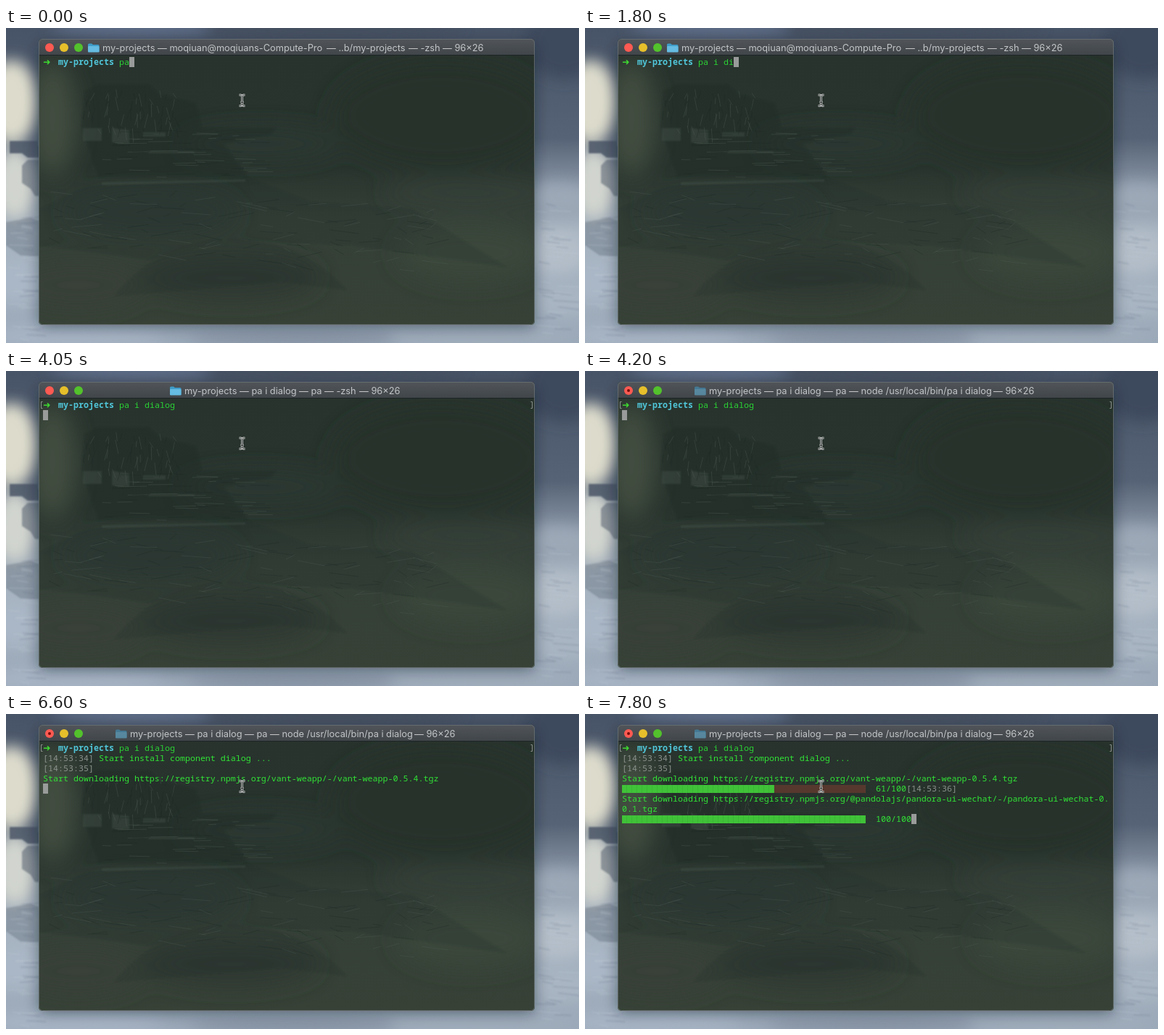
Recreate the animation shown at these times as an HTML page. Size 790 by 435 pixels, loop 8 s.

```html
<!DOCTYPE html>
<html lang="en">
<head>
<meta charset="utf-8">
<title>Terminal install</title>
<style>
  html, body { margin: 0; width: 100%; height: 100%; overflow: hidden; background: #59667a; }
  svg { display: block; width: 100%; height: 100%; }
  .mono { font: 500 11.667px "Noto Sans Mono", "DejaVu Sans Mono", monospace; }
  .title { font: 12.8px Inter, Roboto, sans-serif; fill: #c3c5c7; }
  .dir { fill: #50c5d8; font-weight: 700; }
  .cmd { fill: #2bd335; }
  .log { fill: #31e336; }
  .time { fill: #8c928d; font-weight: 400; }
  .arrow { fill: #3ed831; font: 700 12.5px "DejaVu Sans", sans-serif; }
</style>
</head>
<body>
<svg viewBox="0 0 790 435" preserveAspectRatio="none">
  <defs>
    <linearGradient id="sky" x2="0" y2="1">
      <stop offset="0" stop-color="#475366"/>
      <stop offset=".35" stop-color="#566376"/>
      <stop offset=".5" stop-color="#8794a4"/>
      <stop offset=".65" stop-color="#a9b5c1"/>
      <stop offset="1" stop-color="#9aa8b8"/>
    </linearGradient>
    <linearGradient id="glass" x2="0" y2="1">
      <stop offset="0" stop-color="#28332d"/>
      <stop offset=".45" stop-color="#29342e"/>
      <stop offset=".62" stop-color="#343f37"/>
      <stop offset="1" stop-color="#374136"/>
    </linearGradient>
    <linearGradient id="bar" x2="0" y2="1">
      <stop offset="0" stop-color="#515559"/>
      <stop offset="1" stop-color="#404549"/>
    </linearGradient>
    <pattern id="todo" width="2" height="2" patternUnits="userSpaceOnUse">
      <path d="M0 0h1v1h-1zM1 1h1v1h-1z" fill="#853c2d"/>
    </pattern>
    <pattern id="done" x="51" width="7" height="11" patternUnits="userSpaceOnUse">
      <path d="M0 0h7v11h-7z" fill="#40c238"/>
      <path d="M6.5 0h.5v11h-.5z" fill="#37a833"/>
    </pattern>
    <filter id="soft" x="-50%" y="-50%" width="200%" height="200%"><feGaussianBlur stdDeviation="10"/></filter>
    <filter id="mistBlur" x="-50%" y="-50%" width="200%" height="200%"><feGaussianBlur stdDeviation="16"/></filter>
    <filter id="haze" x="-50%" y="-50%" width="200%" height="200%"><feGaussianBlur stdDeviation="1"/></filter>
    <filter id="shade" x="-10%" y="-10%" width="120%" height="125%"><feGaussianBlur stdDeviation="10"/></filter>
    <clipPath id="pane"><rect x="45" y="15" width="684" height="395" rx="5"/></clipPath>
  </defs>

  <rect width="790" height="435" fill="url(#sky)"/>
  <g id="clouds" filter="url(#soft)"></g>
  <g fill="#4a5667" filter="url(#haze)">
    <path d="M5 156H44V163H50V179H30L22 173H5Z" opacity=".85"/>
    <path d="M22 190L30 182H50V232H40L34 222L22 214Z" opacity=".5"/>
    <path d="M0 268L34 262L50 268V316L20 314L0 300Z" opacity=".3"/>
  </g>
  <g id="streaks" fill="none" filter="url(#haze)"></g>

  <rect x="46" y="24" width="682" height="388" rx="6" fill="#101722" opacity=".5" filter="url(#shade)"/>
  <g clip-path="url(#pane)">
    <rect x="45" y="15" width="684" height="395" fill="url(#glass)"/>
    <g id="mist" filter="url(#mistBlur)"></g>
    <g fill="#202b28" filter="url(#haze)" opacity=".5">
      <path d="M104 136L108 88L128 78H196L212 92L262 104L270 138H372L366 146L300 160L334 206H128L112 160Z" opacity=".8"/>
      <path d="M46 250L110 220L330 206L420 240L560 250L690 330L480 300L300 292L200 320L46 300Z" opacity=".35"/>
      <path d="M150 370Q210 296 304 292T470 362L380 350Z" opacity=".35"/>
    </g>
    <g fill="#4b5a51" opacity=".35" filter="url(#haze)">
      <path d="M106 138H132V156H106ZM146 138L170 141V160L146 158ZM188 144H220V150H188Z"/>
      <path d="M132 213L330 209V212L132 217ZM196 170H260V173H196Z"/>
    </g>
    <g id="hull" fill="none"></g>
    <rect x="45" y="15" width="684" height="23" fill="url(#bar)"/>
    <path d="M45 37.5H729" stroke="#1d2426"/>
  </g>
  <rect x="45.5" y="15.5" width="683" height="394" rx="5" fill="none" stroke="#6b7375" stroke-opacity=".8"/>
  <circle cx="60" cy="27" r="6" fill="#fd5a52"/>
  <circle cx="80" cy="27" r="6" fill="#e6bf2b"/>
  <circle cx="100" cy="27" r="6" fill="#53c22c"/>
  <g id="head" class="title"></g>
  <g id="term" class="mono"></g>
  <g fill="none">
    <path id="beam" d="M321.5 92.5H324L325.5 94L327 92.5H329.5M325.5 94V106M323.5 102.5H327.5M321.5 107.5H324L325.5 106L327 107.5H329.5" stroke="#f0f0f0" stroke-width="2.4"/>
    <path id="core" stroke="#161c1a" stroke-width=".9"/>
  </g>
</svg>
<script>
const LOOP = 8000, COLS = 48;
const $ = id => document.getElementById(id);

// Scenery
function blobs(id, list) {
  $(id).innerHTML = list.map(([x, y, rx, ry, c]) =>
    `<ellipse cx="${x}" cy="${y}" rx="${rx}" ry="${ry}" fill="${c}"/>`).join('');
}
function lines(id, n, seed, place) {
  let s = seed, out = '';
  const rnd = () => (s = s * 16807 % 2147483647) / 2147483647;
  for (let i = 0; i < n; i++) {
    const { x, y, dx, dy, c, o } = place(rnd);
    out += `<path d="M${x.toFixed(1)} ${y.toFixed(1)}l${dx.toFixed(1)} ${dy.toFixed(1)}" stroke="${c}" opacity="${o}"/>`;
  }
  $(id).innerHTML = out;
}
blobs('clouds', [
  [8, 102, 36, 58, '#dddccc'], [12, 215, 30, 50, '#d2d5cf'], [180, 0, 120, 12, '#61708a'],
  [450, 0, 180, 14, '#454f5f'], [770, 20, 55, 50, '#3d4a5d'], [762, 235, 45, 20, '#9da9b7'],
  [760, 310, 45, 30, '#b3bec9'], [765, 375, 50, 22, '#a9b5c2'], [18, 350, 45, 30, '#aab7c6'],
  [90, 426, 130, 14, '#a9b6c6'], [400, 430, 150, 12, '#8592a3'], [660, 428, 130, 12, '#a0adbb']
]);
blobs('mist', [
  [64, 125, 32, 80, '#424d41'], [350, 160, 110, 22, '#2b3733'], [600, 120, 150, 75, '#27312b'],
  [640, 228, 120, 12, '#37433a'], [200, 255, 120, 30, '#2f3b36'], [640, 310, 100, 40, '#3b463b'],
  [100, 355, 90, 32, '#374138'], [310, 345, 120, 30, '#2d3933']
]);
$('core').setAttribute('d', $('beam').getAttribute('d'));
lines('streaks', 60, 71, r => {
  const right = r() > .55;
  return {
    x: right ? 730 + r() * 35 : r() * 30, y: 240 + r() * 190,
    dx: 12 + r() * 25, dy: right ? 4 - r() * 3 : -3 + r() * 7,
    c: r() > .4 ? '#c6d0da' : '#66748a', o: .4
  };
});
lines('hull', 230, 29, r => {
  const k = r();
  const tower = k < .28, deck = k < .5;
  const x = tower ? 108 + r() * 130 : deck ? 130 + r() * 220 : 48 + r() * 540;
  const y = tower ? 84 + r() * 56 : deck ? 142 + r() * 64 : 220 + r() * 85 + x / 18;
  return {
    x, y, dx: tower ? r() * 12 - 6 : 8 + r() * 34, dy: tower ? 6 + r() * 14 : (r() - .5) * (deck ? 2 : 18),
    c: r() > .5 ? '#536259' : '#1d2826', o: tower || deck ? .35 : .3
  };
});

// Title bar: each piece starts at its own x
const TITLES = [
  [[133, 'my-projects'], [209, '— moqiuan@moqiuans-Compute-Pro'], [442, '— ..b/my-projects'], [555, '— -zsh'], [602, '— 96×26']],
  [[246, 'my-projects'], [322, '— pa i dialog'], [404, '— pa'], [439, '— -zsh'], [487, '— 96×26']],
  [[171, 'my-projects'], [247, '— pa i dialog'], [329, '— pa'], [364, '— node /usr/local/bin/pa i dialog'], [563, '— 96×26']]
];
function head(t) {
  const mode = t < 4050 ? 0 : t < 4200 ? 1 : 2;
  const parts = TITLES[mode], busy = mode === 2;
  const folder = `<g transform="translate(${parts[0][0] - 20} 21)" opacity="${busy ? .55 : 1}">
    <path d="M0 2Q0 .5 1.5 .5H5L7 2H14Q15.5 2 15.5 3.5V12H0Z" fill="#3f9cc8"/>
    <rect y="4" width="15.5" height="8.5" rx="1" fill="#65bbe1"/></g>`;
  return folder + parts.map(([x, s]) => `<text x="${x}" y="32">${s}</text>`).join('') +
    (busy ? '<circle cx="60" cy="27" r="2" fill="#760c09"/>' : '');
}

// Terminal content on a 7 by 14 grid
const KEYS = [300, 1050, 1200, 1650, 1800, 2100, 2400, 2550, 2700];
const px = col => 51 + 7 * col;
const run = (row, col, cls, s) => `<text class="${cls}" x="${px(col)}" y="${51 + 14 * row}">${s}</text>`;
const caret = (row, col) => `<rect x="${px(col)}" y="${40 + 14 * row}" width="7" height="14" fill="#999b9a"/>`;
function progress(row, pct) {
  const n = Math.ceil(COLS * pct / 100), y = 42 + 14 * row;
  return `<rect x="51" y="${y}" width="${n * 7}" height="11" fill="url(#done)"/>` +
    `<rect x="${px(n)}" y="${y}" width="${(COLS - n) * 7}" height="11" fill="url(#todo)"/>` +
    run(row, COLS + 2, 'log', pct + '/100');
}
function term(t) {
  const typed = 'pa i dialog'.slice(0, 2 + KEYS.filter(k => t >= k).length);
  let out = run(0, 0, 'arrow', '➜') + run(0, 3, 'dir', 'my-projects') + run(0, 15, 'cmd', typed);
  let at = [0, 15 + typed.length];
  if (t >= 4050) {
    out += '<path d="M50.5 42.5H48.5V51.5H50.5M723.5 42.5H725.5V51.5H723.5" fill="none" stroke="#8c928d"/>';
    at = [1, 0];
  }
  if (t >= 5550) {
    out += run(1, 0, 'time', '[14:53:34]') + run(1, 11, 'log', 'Start install component dialog ...');
    at = [2, 0];
  }
  if (t >= 6600) {
    out += run(2, 0, 'time', '[14:53:35]') +
      run(3, 0, 'log', 'Start downloading https://registry.npmjs.org/vant-weapp/-/vant-weapp-0.5.4.tgz');
    at = [4, 0];
  }
  if (t >= 7200) {
    out += progress(4, t < 7350 ? 40 : 61);
    at = [4, 56];
  }
  if (t >= 7350) {
    out += run(4, 56, 'time', '[14:53:36]') +
      run(5, 0, 'log', 'Start downloading https://registry.npmjs.org/@pandolajs/pandora-ui-wechat/-/pandora-ui-wechat-0.') +
      run(6, 0, 'log', '0.1.tgz');
    at = [7, 0];
  }
  if (t >= 7800) {
    out += progress(7, 100);
    at = [7, 57];
  }
  return out + caret(...at);
}

const shown = {};
function put(id, html) {
  if (shown[id] !== html) $(id).innerHTML = shown[id] = html;
}
function render(t) {
  put('head', head(t));
  put('term', term(t));
}
const start = performance.now();
function tick() {
  render((performance.now() - start) % LOOP);
  requestAnimationFrame(tick);
}
tick();
</script>
</body>
</html>
```
